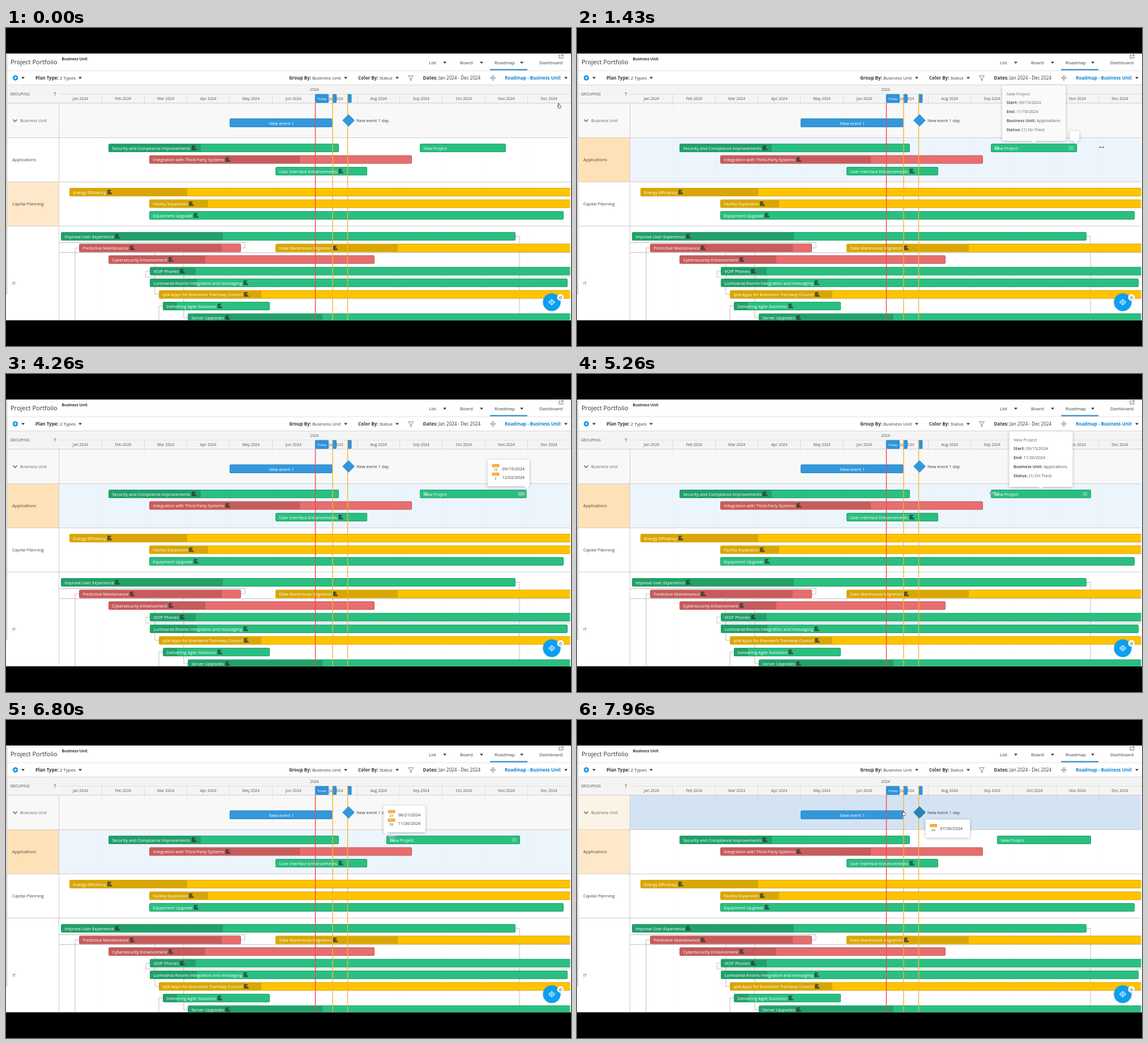
An HTML page with a canvas that plays this animation: 998 px wide and 561 px high, repeating every 8 s.

```html
<!DOCTYPE html>
<html lang="en">
<head>
<meta charset="utf-8">
<title>Roadmap</title>
<style>
html, body { margin: 0; width: 100%; height: 100%; overflow: hidden; background: #000; }
canvas { display: block; }
</style>
</head>
<body>
<canvas id="stage" width="998" height="561"></canvas>
<script>
const c = document.getElementById('stage').getContext('2d');
const W = 998, TOP = 45, BOTTOM = 515.5, LEFT = 94, MONTH = 75.22, ROW = 20.5, LAG = 60;
const FONT = '"Open Sans", "Noto Sans", sans-serif';
const MONTHS = 'Jan Feb Mar Apr May Jun Jul Aug Sep Oct Nov Dec'.split(' ');
const INK = '#3a3a3a', LINE = '#cdcdcd', BLUE = '#3398db', AMBER = '#f5b335';
const FILL = { green: ['#2abf80', '#22a06a'], red: ['#e66e6e', '#c65c5c'], yellow: ['#fec300', '#d8a606'] };

// Each section: name, top edge, first row, bars (label, colour, left, progress edge, right)
const SECTIONS = [
  ['Business Unit', 132, 0, []],
  ['Applications', 193, 211.5, [
    ['Security and Compliance Improvements', 'green', 181, 344, 588],
    ['Integration with Third-Party Systems', 'red', 253, 519, 717],
    ['User Interface Enhancements', 'green', 476, 0, 638]]],
  ['Capital Planning', 271, 289.5, [
    ['Energy Efficiency', 'yellow', 112, 320],
    ['Facility Expansion', 'yellow', 253, 357],
    ['Equipment Upgrade', 'green', 253, 0, 985]]],
  ['IT', 349, 367.5, [
    ['Improve User Experience', 'green', 97, 383, 900],
    ['Predictive Maintenance', 'red', 129, 381, 415],
    ['Data Warehouse Migration', 'yellow', 476, 692],
    ['Cybersecurity Enhancement', 'red', 181, 352, 651],
    ['VOIP Phones', 'green', 254, 335],
    ['Lumivanta Rooms Integration and messaging', 'green', 254, 337, 992],
    ['qVA Apps for Bramwick Tramway Council', 'yellow', 270, 451],
    ['Delivering Agile Solutions', 'green', 277, 302, 466],
    ['Server Upgrades', 'green', 321, 559]]]
];

// Pointer moves: start, end, destination
const MOVES = [
  [30, 830, 958, 246], [860, 930, 881, 212], [1220, 1640, 972, 209], [2560, 3160, 984, 210],
  [3700, 4452, 897, 212], [4452, 4510, 908, 212], [4530, 5260, 733, 210], [5800, 6200, 664, 205],
  [6200, 6550, 652, 205], [6550, 7000, 703, 205], [7030, 7290, 741.9, 205], [7560, 7960, 577, 164]
];

const clamp = v => Math.max(0, Math.min(1, v));
const ease = v => (v = clamp(v)) * v * (3 - 2 * v);
const mix = (a, b, p) => a + (b - a) * p;

function pointer(t) {
  let x = 977, y = 137;
  for (const [from, to, nx, ny] of MOVES) {
    const p = ease((t - from) / (to - from));
    x = mix(x, nx, p);
    y = mix(y, ny, p);
  }
  return [x, y];
}

// A bar edge trails the pointer between grab and drop
const follow = (t, home, grab, drop) => mix(home, pointer(Math.min(t, drop) - LAG)[0], ease((t - grab) / 180));
const startEdge = t => follow(t, 731, 5400, 7400);
const endEdge = t => follow(t, 883, 1420, 4580);

function dateAt(x) {
  const m = Math.floor((x - LEFT) / MONTH), part = (x - LEFT) / MONTH - m;
  return new Date(2024, m, 1 + Math.round(part * new Date(2024, m + 1, 0).getDate()));
}

function format(date) {
  const two = n => String(n).padStart(2, '0');
  return `${two(date.getMonth() + 1)}/${two(date.getDate())}/${date.getFullYear()}`;
}

function rect(x, y, w, h, color) {
  c.fillStyle = color;
  c.fillRect(x, y, w, h);
}

function round(x, y, w, h, r, color) {
  c.beginPath();
  c.roundRect(x, y, w, h, r);
  c.fillStyle = color;
  c.fill();
}

function disc(x, y, r, color) {
  c.beginPath();
  c.arc(x, y, r, 0, 7);
  c.fillStyle = color;
  c.fill();
}

function trace(points) {
  c.beginPath();
  for (let i = 0; i < points.length; i += 2) c.lineTo(points[i], points[i + 1]);
}

function path(points, color, width = 1) {
  trace(points);
  c.strokeStyle = color;
  c.lineWidth = width;
  c.stroke();
}

function poly(points, color) {
  trace(points);
  c.fillStyle = color;
  c.fill();
}

// Draws text centred vertically on y and returns its width
function text(s, x, y, size = 7.45, color = INK, align = 'left', weight = 400) {
  c.font = `${weight} ${size}px ${FONT}`;
  c.textAlign = align;
  c.fillStyle = color;
  c.fillText(s, x, y + size * 0.36);
  return c.measureText(s).width;
}

function pair(name, value, x, y, size, color = INK) {
  const w = text(name + ' ', x, y, size, color, 'left', 700);
  text(value, x + w, y, size, color);
}

const caret = (x, y) => poly([x - 3, y - 1.5, x + 3, y - 1.5, x, y + 2], '#333');

function bar(y, label, color, x, progress, end = W + 12) {
  const [light, dark] = FILL[color], top = y - 7.5;
  round(x, top, end - x, 15, 2.5, dark);
  round(x + 1, top + 1, end - x - 2, 13, 2, light);
  if (progress) rect(x + 1, top + 1, progress - x - 1, 13, dark);
  return text(label, x + 6.5, y + .6, 7.45, '#fff');
}

function planIcon(x, y) {
  [6, 4.5, 6.5, 8].forEach((w, i) => rect(x, y - 4 + i * 2.1, w, 1.5, '#2d3b36'));
  rect(x, y - 4, 1.3, 8, '#2d3b36');
}

function grip(x, y) {
  for (let i = 0; i < 4; i++) rect(x, y - 3 + i * 1.7, 8, 1, 'rgba(255,255,255,.4)');
}

function toolbar() {
  text('Project Portfolio', 8, 60.5, 11, '#333');
  text('Business Unit', 98.5, 54.5, 6.7, '#333', 'left', 700);
  text('List', 747, 61, 8);
  text('Board', 802, 61, 8);
  text('Roadmap', 863, 61, 8);
  text('Dashboard', 942, 61, 8);
  [775, 840, 911].forEach(x => caret(x, 61));
  rect(0, 75, W, 1, '#e2e2e2');
  rect(855, 72.5, 66, 2, '#1b82c5');
  path([980, 47.5, 977, 47.5, 977, 53, 984, 53, 984, 50.5], '#555', .8);
  path([980, 50.5, 984, 47, 981.5, 47, 984, 47, 984, 49.5], '#555', .8);

  disc(16.5, 88, 4.7, '#1599e8');
  path([14, 88, 19, 88], '#fff');
  path([16.5, 85.5, 16.5, 90.5], '#fff');
  pair('Plan Type:', '2 Types', 52, 88.5, 8);
  pair('Group By:', 'Business Unit', 500, 88.5, 8);
  pair('Color By:', 'Status', 622, 88.5, 8);
  pair('Dates:', 'Jan 2024 - Dec 2024', 736.5, 88.5, 8.1);
  text('Roadmap - Business Unit', 881, 88.5, 8, '#1284d0', 'left', 700);
  [30, 131, 600, 691, 989].forEach(x => caret(x, 88));
  path([710.5, 84, 719.5, 84, 716, 88.5, 716, 93, 714, 91.5, 714, 88.5, 710.5, 84], '#666', .8);
  c.strokeRect(858.5, 86.5, 3, 3);
  for (let i = 0; i < 4; i++) {
    c.save();
    c.translate(860, 88);
    c.rotate(i * Math.PI / 2);
    poly([5, 0, 3, 2, 3, -2], '#888');
    c.restore();
  }
}

function header() {
  rect(0, 100, W, 33, '#f4f4f4');
  rect(0, 100, W, 1, '#d8d8d8');
  rect(LEFT, 116, W, 1, '#dedede');
  rect(0, 132, W, 1, LINE);
  text('GROUPING', 7, 116.5, 6.7, '#555');
  path([86.5, 119.5, 86.5, 113.5, 84.5, 115.5, 86.5, 113.5, 88.5, 115.5], '#777', .8);
  text('2024', 545, 108.5, 6.7, '#555', 'center');
  MONTHS.forEach((m, i) => {
    if (i) rect(Math.floor(LEFT + i * MONTH), 117, 1, 15, '#dadada');
    text(m + ' 2024', LEFT + (i + .5) * MONTH, 124.5, 6.8, '#555', 'center');
  });
}

function sectionRows(hover, selected) {
  SECTIONS.forEach(([name, y], i) => {
    const next = SECTIONS[i + 1], h = (next ? next[1] : BOTTOM) - y;
    const on = hover === i, pick = selected === i, base = i ? '#fff' : '#f8f8f8';
    rect(LEFT, y, W, h, on ? (i ? '#edf5fc' : '#d4e3f3') : base);
    rect(0, y, LEFT, h, pick ? (on ? '#ffe1b7' : '#ffe8ca') : on ? '#fbf3e5' : base);
    text(name, i ? 11 : 25, next ? y + h / 2 + .5 : 450, 7.4, i ? '#444' : '#666');
    rect(0, y, W, 1, LINE);
  });
  for (let i = 1; i < 12; i++) rect(Math.floor(LEFT + i * MONTH), 133, 1, BOTTOM, 'rgba(0,0,0,.018)');
  path([12.5, 161.5, 16, 165, 19.5, 161.5], '#888', 2);
  rect(93, 100, 1, BOTTOM, LINE);
}

// Dependency lines run 7 px outside the bar edge, from one row to another
function links(firstRow) {
  const rowY = r => firstRow + r * ROW;
  const elbow = (edge, from, to, side = -7) =>
    path([edge, rowY(from), edge + side, rowY(from), edge + side, rowY(to)], '#bdbdbd');
  elbow(900, 0, 8, 7);
  elbow(415, 1, .55, 7);
  elbow(129, 1, 8);
  elbow(254, 3, 3.5);
  elbow(270, 5, 1.4);
  elbow(277, 6, 8);
  elbow(321, 7, 1.4);
  [[LEFT, 422, .55], [LEFT, W, 1.4], [247, W, 3.5]].forEach(([a, b, r]) => path([a, rowY(r), b, rowY(r)], '#bdbdbd'));
}

// A bar shares the previous row when it begins after that bar has ended
function sectionBars([, , firstRow, bars]) {
  let y = firstRow - ROW, previousEnd = W;
  for (const b of bars) {
    if (b[2] < previousEnd) y += ROW;
    previousEnd = b[4] || W;
    planIcon(b[2] + bar(y, ...b) + 9.5, y);
  }
}

function markers(dark) {
  [[546, 24], [576, 8], [603, 7.5]].forEach(([x, w]) => round(x, 116.5, w, 15.5, 2, '#2f92d8'));
  text('Today', 558, 124.5, 6, '#fff', 'center');
  rect(545.8, 132, 1.4, 384, '#f34848');
  rect(576.2, 116, 1.4, 400, AMBER);
  rect(602.8, 116, 1.4, 400, AMBER);
  poly([594, 163, 605, 152, 616, 163, 605, 174], dark ? '#2c80ba' : BLUE);
}

function tip(x, y, w, h, tail) {
  c.save();
  c.shadowColor = 'rgba(0,0,0,.28)';
  c.shadowBlur = 5;
  c.shadowOffsetY = 1;
  round(x, y, w, h, 1.5, '#fff');
  c.restore();
  if (tail) poly([tail - 4, y + h, tail + 4, y + h, tail, y + h + 4], '#fff');
}

function dateLine(date, x, y) {
  rect(x - 6, y - 8, 12.5, 5.5, '#f7a128');
  text(MONTHS[date.getMonth()], x, y - 5.2, 4.2, '#fff', 'center');
  text(date.getDate(), x, y + 2.2, 6, INK, 'center');
  text(format(date), x + 11.7, y, 7.5);
}

function infoTip(t, from, to, start, end) {
  if (t < from || t > to) return;
  const mid = (start + end) / 2;
  const lines = [['Start:', format(dateAt(start))], ['End:', format(dateAt(end))],
    ['Business Unit:', 'Applications'], ['Status:', '(1) On Track']];
  c.save();
  c.globalAlpha = Math.min(clamp((t - from) / 70), clamp((to - t) / 180));
  tip(mid - 56, 101, 112, 98, mid);
  text('New Project', mid - 48.5, 116, 7.45, '#666');
  lines.forEach(([name, value], i) => pair(name, value, mid - 48.5, 131.8 + i * 15.9, 7.3, '#555'));
  c.restore();
}

function helpButton() {
  c.save();
  c.shadowColor = 'rgba(0,0,0,.2)';
  c.shadowBlur = 3;
  disc(964, 483.7, 15.5, '#0d9ff0');
  disc(979.5, 475.3, 6, '#fff');
  c.restore();
  c.beginPath();
  c.arc(964, 483.7, 4, 0, 7);
  c.strokeStyle = '#fff';
  c.lineWidth = 1;
  c.stroke();
  [[0, 5.5], [-5, 1.5], [5, 1.5], [-1.6, 1], [1.6, 1]].forEach(([x, r]) => path([964 + x, 483.7 - r, 964 + x, 483.7 + r], '#fff'));
  c.beginPath();
  c.arc(979.5, 475.6, 2.3, -.9, 4.04);
  c.strokeStyle = '#444';
  c.lineWidth = .8;
  c.stroke();
  path([979.5, 472.6, 979.5, 475.3], '#444', .8);
}

function cursor(x, y, resize) {
  c.save();
  c.translate(x, y);
  if (resize) {
    for (const [color, w] of [['#fff', 2.2], ['#444', .8]]) {
      path([-4, 0, 4, 0], color, w);
      for (const s of [-1, 1]) path([s * 2.3, -1.8, s * 4.2, 0, s * 2.3, 1.8], color, w);
    }
  } else {
    const hand = [-1.5, -4, -.3, -4, -.1, -1, 3, 0, 3.3, 1.8, 2.3, 4.5, -1.2, 4.5, -3.3, 1, -2.7, .4, -1.5, 1.4, -1.5, -4];
    poly(hand, '#fff');
    path(hand, '#333', .8);
  }
  c.restore();
}

function draw(t) {
  const [px, py] = pointer(t), start = startEdge(t), end = endEdge(t);
  const hover = py < 139 ? -1 : py < 193 ? 0 : 1;
  const onBar = t > 900 && t < 7560, dragStart = t > 5500 && t < 7560, dragEnd = t > 1400 && t < 4530;
  const onMilestone = t > 7560 && px < 616;

  rect(0, 0, W, 561, '#000');
  c.save();
  c.beginPath();
  c.rect(0, TOP, W, BOTTOM - TOP);
  c.clip();
  rect(0, TOP, W, BOTTOM, '#fff');
  toolbar();
  sectionRows(hover, t < 1260 ? 2 : 1);
  header();
  rect(0, TOP, 2.5, 425, '#d6d6d6');

  links(367.5);
  SECTIONS.forEach(sectionBars);
  bar(211.5, 'New Project', 'green', start, 0, end);
  if (onBar) {
    grip(start + 6.5, 211.5);
    grip(end - 14.5, 211.5);
  }
  round(395, 159.5, 181.5, 15.5, 2.5, '#2c87c4');
  round(396, 160.5, 179.5, 13.5, 2, BLUE);
  text('New event 1', 486.5, 167.8, 7.7, '#fff', 'center');
  text('New event 1 day', 619, 163.5);
  markers(onMilestone);
  rect(996, 133, 2, BOTTOM, 'rgba(255,255,255,.7)');
  helpButton();

  infoTip(t, 860, 1600, start, end);
  infoTip(t, 5150, 5550, start, end);
  if (dragEnd && t < 1460) tip(end - 13, 182, 17, 17, end - 2);
  else if (dragEnd || dragStart) {
    const x = dragStart ? start - 5 : end - 69;
    tip(x, 151, 74, 47, dragStart ? start : end);
    dateLine(dateAt(startEdge(t - 20)), x + 14, 167);
    dateLine(dateAt(endEdge(t - 20)), x + 14, 182);
  }
  if (onMilestone) {
    tip(615.5, 175.5, 78.5, 32);
    dateLine(new Date(2024, 6, 26), 629.5, 191.5);
  }
  cursor(px, py, onBar && !(t > 4530 && t < 5220));
  c.restore();
}

function frame(now) {
  draw(now % 8000);
  requestAnimationFrame(frame);
}
requestAnimationFrame(frame);
</script>
</body>
</html>
```
